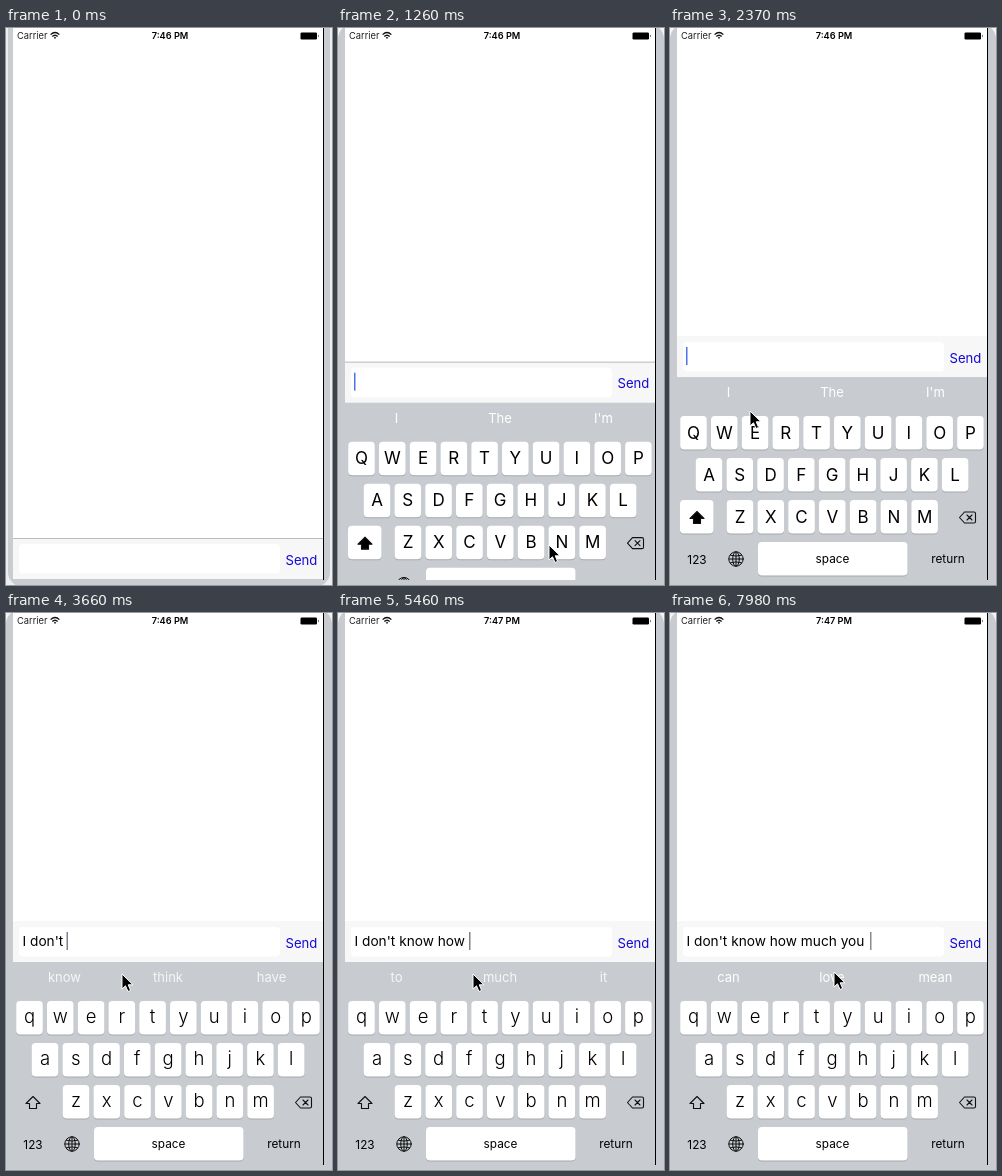
An HTML page that plays this animation: 326 px wide and 557 px high, repeating every 8 s.

```html
<!DOCTYPE html>
<html lang="en">
<head>
<meta charset="utf-8">
<title>Predictive typing</title>
<style>
  html, body { margin: 0; width: 100%; height: 100%; overflow: hidden; background: #fff; }
  svg { display: block; width: 326px; height: 557px; font-family: Inter, Roboto, sans-serif; }
  .mid { text-anchor: middle; }
  .line { fill: none; stroke: #111; stroke-width: 1.1; stroke-linejoin: round; stroke-linecap: round; }
</style>
</head>
<body>
<svg viewBox="0 0 326 557">
  <defs><clipPath id="screen"><rect x="7" width="311" height="552"/></clipPath></defs>
  <rect width="326" height="557" fill="#eceef0"/>
  <rect x="2" y="-14" width="322" height="573" rx="15" fill="#c9cdd1"/>
  <g id="focused">
    <rect width="326" height="557" fill="#c8cbd0"/>
    <path d="M0 0H5Q1 3 0 10zM326 0H321Q325 3 326 10z" fill="#f4f5f6"/>
  </g>
  <rect x="7" width="310" height="552" fill="#fff"/>

  <text x="11" y="11" font-size="9.3" fill="#222">Carrier</text>
  <g class="line" style="stroke-width:1.3;stroke-linecap:butt">
    <path d="M44.6 6.6Q49 2.4 53.4 6.6M46.3 8.5Q49 5.9 51.7 8.5"/>
    <path d="M47.8 9.4Q49 8.6 50.2 9.4L49 11z" fill="#111" stroke="none"/>
  </g>
  <text id="clock" class="mid" x="164" y="11" font-size="9.2" font-weight="600"></text>
  <rect x="294.5" y="4.5" width="16.5" height="7" rx="1.3"/>
  <path d="M312 6.5q1.5 1.5 0 3z"/>

  <g clip-path="url(#screen)">
    <g id="panel">
      <rect x="7" y="308" width="310" height="41" fill="#f7f7f7"/>
      <rect id="border" x="7" y="308" width="310" height="1" fill="#b9bbbd"/>
      <rect x="13" y="314" width="261" height="29.5" rx="4" fill="#fff"/>
      <text id="typed" x="16.5" y="333.2" font-size="13.7"></text>
      <rect id="caret" y="319" width="1.5" height="18"/>
      <text x="279.5" y="334.5" font-size="13.1" fill="#1408d8">Send</text>
      <rect x="7" y="349" width="310" height="210" fill="#c8cbd0"/>
      <rect id="press" y="349" width="103.3" height="33" fill="#e4e6e9"/>
      <g id="words" class="mid" font-size="13"></g>
      <g id="keys" class="mid"></g>
      <g class="line">
        <path id="shift" d="M27 483.5L34 490.5H30.5V495.5H23.5V490.5H20z"/>
        <path d="M289.5 489.5L294.5 484H304Q305.5 484 305.5 485.5V493.5Q305.5 495 304 495H294.5zM297 487l5 5m0-5l-5 5"/>
        <g stroke-width="1">
          <circle cx="66" cy="531" r="7.2"/>
          <ellipse cx="66" cy="531" rx="3.3" ry="7.2"/>
          <path d="M66 524V538M59 531H73M60.5 527.3Q66 529 71.5 527.3M60.5 534.7Q66 533 71.5 534.7"/>
        </g>
      </g>
      <g class="mid" font-size="11.8">
        <text x="27" y="535.5">123</text>
        <text x="162.5" y="535">space</text>
        <text x="278" y="535">return</text>
      </g>
    </g>
  </g>
  <path d="M317.5 0V552" stroke="#000"/>
  <path id="pointer" d="M0 0V15L3.5 11.8L6 17.5L8.6 16.4L6.2 10.8H11z" stroke="#fff" stroke-width="1" stroke-linejoin="round"/>
</svg>
<script>
const LOOP = 8000, SLIDE_START = 1050, SLIDE = 202;
const $ = id => document.getElementById(id);
const clamp = v => Math.min(1, Math.max(0, v));
const ramp = (t, from, to) => clamp((t - from) / (to - from));

// time of insertion, text, caret x, suggestions, cell tapped (0 to 2)
const steps = [
  [SLIDE_START, "", 16, ["I", "The", "I'm"]],
  [2880, "I", 25, ["am", "don't", "have"], 0],
  [3540, "I don't", 60.5, ["know", "think", "have"], 1],
  [3990, "I don't know", 99, ["what", "how", "why"], 0],
  [5340, "I don't know how", 131, ["to", "much", "it"], 1],
  [6150, "I don't know how much", 172, ["you", "I love", "of"], 1],
  [7620, "I don't know how much you", 200, ["can", "love", "mean"], 0]
];

// pointer path: time, x, y
const path = [
  [0, 221, -22], [90, 221, -22], [240, 182, 562], [510, 197, 560], [600, 195, 517],
  [1080, 195, 517], [1230, 211, 517], [1380, 211, 517], [1860, 181, 465], [2370, 80, 383],
  [2670, 55, 362], [2940, 55, 362], [3360, 116, 361], [3660, 116, 361], [3870, 72, 362],
  [4020, 72, 362], [4290, 110, 362], [4650, 135, 361], [5460, 135, 361], [5760, 148, 361],
  [6780, 148, 361], [7080, 63, 361], [7620, 63, 361], [7950, 164, 359], [LOOP, 164, 359]
];

const cellX = i => 58.5 + i * 103.5;
const keyRect = (x, y, w) =>
  `<rect x="${x}" y="${y + 1}" width="${w}" height="33.5" rx="4" fill="#a5a8ad"/>` +
  `<rect x="${x}" y="${y}" width="${w}" height="33.5" rx="4" fill="#fff"/>`;

let keys = keyRect(88, 514, 149.5) + `<g id="shiftKey">${keyRect(10, 472, 33.5)}</g>`;
const letters = [];
["QWERTYUIOP", "ASDFGHJKL", "ZXCVBNM"].forEach((row, r) => [...row].forEach((letter, i) => {
  const x = [23.5, 39, 70][r] + i * 30.77, y = 388 + r * 42;
  keys += keyRect(x - 13.3, y, 26.6);
  letters.push([letter, x, y + 22.8]);
}));
const letterSet = (id, size, weight, lift, format) => `<g id="${id}" font-size="${size}" font-weight="${weight}">` +
  letters.map(([c, x, y]) => `<text x="${x}" y="${y - lift}">${format(c)}</text>`).join("") + "</g>";
$("keys").innerHTML = keys + letterSet("upper", 17, 400, 0, c => c) +
  letterSet("lower", 18.5, 300, 0.7, c => c.toLowerCase());
$("words").innerHTML = [0, 1, 2].map(i => `<text x="${cellX(i)}" y="369"></text>`).join("");
const words = [...$("words").children];
const set = (id, attrs) => Object.entries(attrs).forEach(([k, v]) => $(id).setAttribute(k, v));

function pointerAt(t) {
  const n = Math.max(1, path.findIndex(p => p[0] > t));
  const [t0, x0, y0] = path[n - 1], [t1, x1, y1] = path[n];
  let u = ramp(t, t0, t1);
  if (t > 600) u = u * u * (3 - 2 * u);
  return [x0 + (x1 - x0) * u, y0 + (y1 - y0) * u];
}

function caretOpacity(age) {
  const phase = age % 1000;
  return 1 - 0.95 * (ramp(phase, 350, 480) - ramp(phase, 650, 800));
}

function draw(t) {
  // critically damped slide of the keyboard
  const s = Math.max(0, t - SLIDE_START) * 0.017;
  const left = (1 + s) * Math.exp(-s);
  set("panel", { transform: `translate(0 ${SLIDE * left})` });
  set("border", { opacity: clamp(left * 10) });
  set("focused", { opacity: ramp(t, 780, 870) });
  $("clock").textContent = t < 4710 ? "7:46 PM" : "7:47 PM";

  const n = Math.max(0, steps.findLastIndex(step => step[0] <= t));
  const [start, text, caretX, suggestions] = steps[n];
  const next = steps[n + 1];
  const pressed = next && t > next[0] - 120 ? next[4] : -1;
  $("typed").textContent = text;
  set("caret", {
    x: caretX,
    fill: n ? "#7d8289" : "#4b74e6",
    opacity: t < SLIDE_START ? 0 : caretOpacity(t - start)
  });
  words.forEach((word, i) => {
    word.textContent = suggestions[i];
    word.setAttribute("fill", i === pressed ? "#111" : "#fff");
    word.setAttribute("opacity", n ? ramp(t, start - 30, start + 150) : 1);
  });
  set("press", { x: 7 + Math.max(0, pressed) * 103.3, opacity: pressed < 0 ? 0 : 1 });

  const capital = n === 0;
  set("upper", { opacity: +capital });
  set("lower", { opacity: +!capital });
  set("shiftKey", { opacity: +capital });
  set("shift", { fill: capital ? "#000" : "none" });
  set("pointer", { transform: `translate(${pointerAt(t)})` });
}

function tick() {
  draw(performance.now() % LOOP);
  requestAnimationFrame(tick);
}
tick();
</script>
</body>
</html>
```
